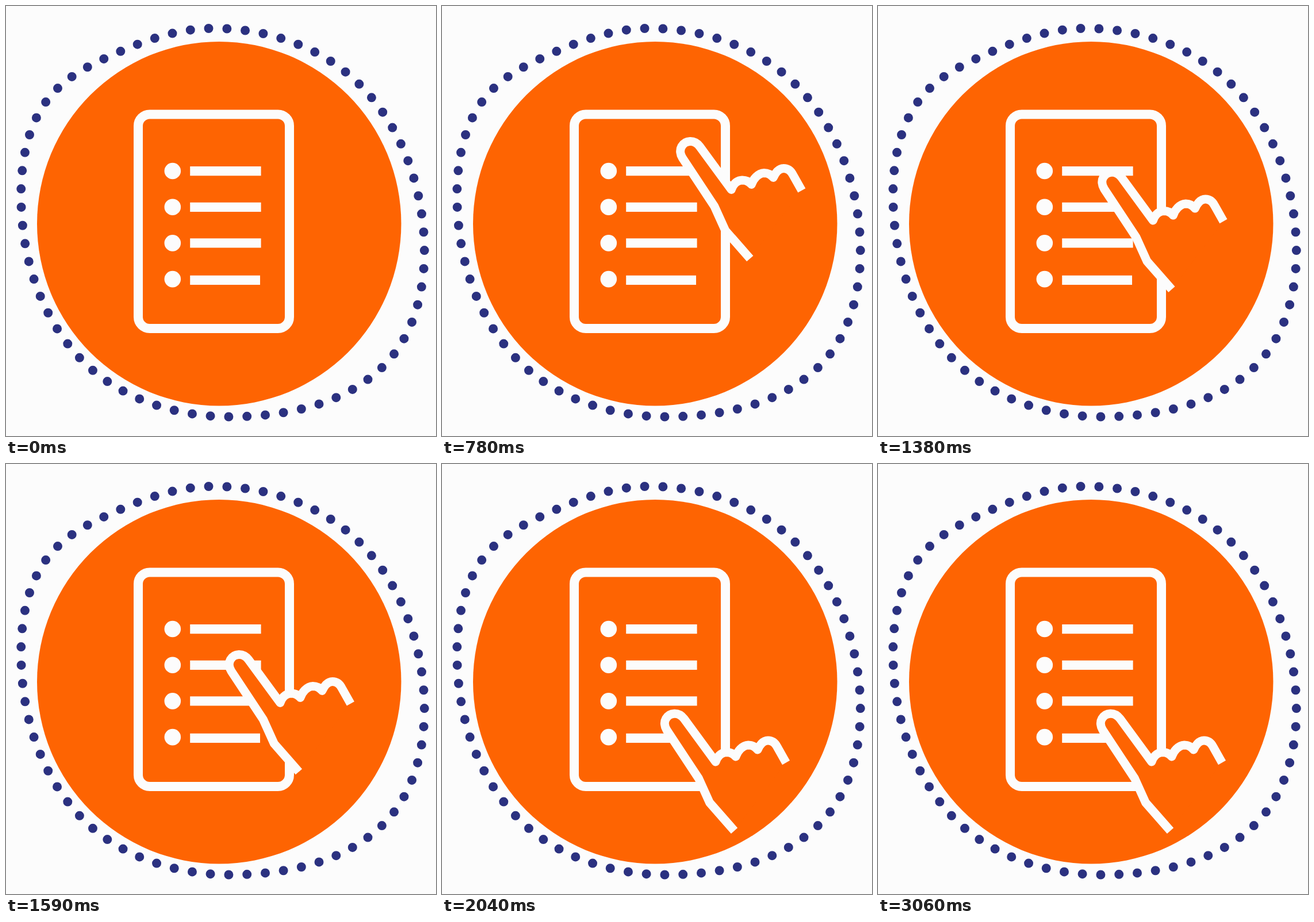
An HTML page that plays this animation: 748 by 748 pixels, repeating every 3.6 s.

```html
<!DOCTYPE html>
<html lang="en">
<head>
<meta charset="utf-8">
<title>Checklist</title>
<style>
  html, body { margin: 0; width: 100%; height: 100%; overflow: hidden; background: #fcfcfc; }
  svg { display: block; width: 100%; height: 100%; }
  .line { fill: none; stroke: #fcfcfc; }
  .dots { fill: none; stroke-linecap: round; }
  .orange { fill: #fe6402; }
</style>
</head>
<body>
<svg viewBox="0 0 748 748">
  <defs>
    <clipPath id="disc"><circle cx="370.75" cy="378.75" r="316.75"/></clipPath>
  </defs>

  <path class="dots" stroke="#2b3180" stroke-width="16" pathLength="69" stroke-dasharray="0 1"
    d="M352.5 39 C447.8 36.8 545.8 68 614 135.5 C682.3 203 719 297.3 726.5 392.5
       C733.2 477.2 715.8 569.2 654.5 628.5 C585.5 695.2 483 714.5 388.5 714.5
       C294 714.5 194.3 682 129 613 C71 551.7 37.7 467.7 29 383
       C20.3 298.3 28.8 202.2 89.5 143.5 C119.8 114.2 160.3 96 199 79
       C247.3 57.8 299.6 40.3 352.5 39 Z"/>
  <circle class="orange" cx="370.75" cy="378.75" r="316.75"/>

  <rect class="line" x="230" y="188.4" width="263" height="372.6" rx="20" stroke-width="16"/>
  <path class="line dots" stroke-width="28.6" stroke-dasharray="0 62.7" d="M289.8 287 V476"/>
  <path class="line" stroke-width="16.2"
    d="M320.2 287.1 h123.4 M320.2 349.8 h123.4 M320.2 412.4 h123.4 M320.2 476.8 h121.8"/>

  <g clip-path="url(#disc)">
    <path id="hand" class="orange" stroke="#fcfcfc" stroke-width="15" stroke-linejoin="round"
      d="M508.5 638 L465.5 589 L446.5 547 L391 463 C387 456.5 386 449 389.5 443
         C396 432 411.5 430.5 421 443 L476 518 C478 511 484 502 495 501.5
         C501 501.5 507 504 511 509 C514 500 522 489.5 533 489 C540 489 545 492 549 497
         C552 490 558 481 567 481 C575 481 580 486 583 492 L598.5 519.5"/>
  </g>
</svg>
<script>
const LOOP = 3600, STEP = 30;
const REST = { x: 380, y: 426 }, CENTER = { x: 492.5, y: 535 };
const PRESS = { start: 2640, length: 420, depth: 0.04 };
const hand = document.getElementById('hand');

// Glide in from the right, then turn down along the list
const path = [
  { t: 0, x: 668, y: 224 },
  { t: 390, x: 519.8, y: 224.7 },
  { t: 780, x: 407.3, y: 227.4 },
  { t: 1140, x: 387.5, y: 244 },
  { t: 1590, x: 380.9, y: 323.4 },
  { t: 2040, ...REST }
];

function rate(i, axis) {
  const a = path[i], b = path[i + 1];
  return (b[axis] - a[axis]) / (b.t - a.t);
}

function slope(i, axis) {
  if (i === 0) return rate(0, axis);
  if (i === path.length - 1) return rate(i - 1, axis);
  const before = path[i].t - path[i - 1].t, after = path[i + 1].t - path[i].t;
  return (rate(i - 1, axis) * after + rate(i, axis) * before) / (before + after);
}

function place(t, axis) {
  const next = path.findIndex(p => t < p.t);
  if (next < 0) return REST[axis];
  const i = next - 1, a = path[i], b = path[next];
  const span = b.t - a.t, u = (t - a.t) / span, v = 1 - u;
  return a[axis] * (1 + 2 * u) * v * v + b[axis] * (1 + 2 * v) * u * u
    + span * u * v * (slope(i, axis) * v - slope(next, axis) * u);
}

function pressScale(t) {
  const u = Math.min(1, Math.max(0, (t - PRESS.start) / PRESS.length));
  return 1 - PRESS.depth * Math.sin(Math.PI * u) ** 2;
}

function draw(time) {
  const t = Math.floor((time % LOOP) / STEP) * STEP, s = pressScale(t);
  const shift = axis => place(t, axis) - REST[axis] + CENTER[axis] * (1 - s);
  hand.setAttribute('transform', `translate(${shift('x')} ${shift('y')}) scale(${s})`);
}

const start = performance.now();
function tick() {
  draw(performance.now() - start);
  requestAnimationFrame(tick);
}
tick();
</script>
</body>
</html>
```
